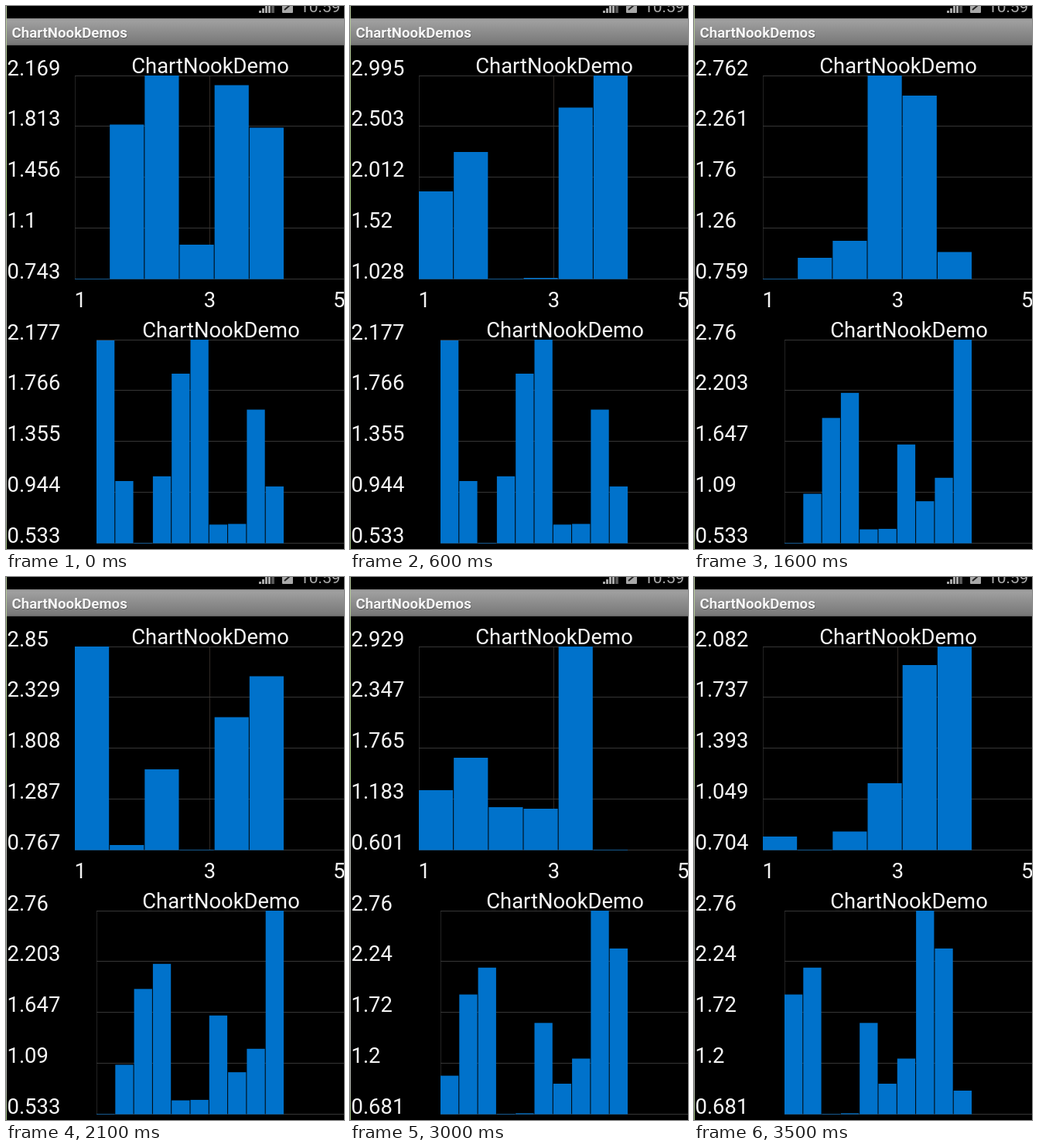
Recreate the animation shown at these times as an HTML page. Size 437 by 703 pixels, loop 3800 ms.

```html
<!DOCTYPE html>
<html lang="en">
<head>
<meta charset="utf-8">
<title>Bar charts</title>
<style>
  html, body { margin: 0; width: 100%; height: 100%; overflow: hidden; background: #000; }
  svg { display: block; width: 437px; height: 703px; font: 27.4px Roboto, sans-serif; fill: #f6f6f6; }
</style>
</head>
<body>
<svg id="stage" viewBox="0 0 437 703">
  <defs>
    <linearGradient id="bar" x2="0" y2="1">
      <stop offset="0" stop-color="#8d8d8d"/>
      <stop offset=".08" stop-color="#a0a0a0"/>
      <stop offset=".5" stop-color="#8c8c8c"/>
      <stop offset=".94" stop-color="#797979"/>
      <stop offset="1" stop-color="#606060"/>
    </linearGradient>
    <linearGradient id="edge" x2="0" y2="1">
      <stop offset="0" stop-color="#b4c69c"/>
      <stop offset=".37" stop-color="#a9d183"/>
      <stop offset=".4" stop-color="#b9bdb5"/>
      <stop offset=".94" stop-color="#b2b6ae"/>
      <stop offset="1" stop-color="#9cc079"/>
    </linearGradient>
  </defs>
  <rect width="437" height="703" fill="#000"/>
  <g fill="#a9a9a9">
    <path d="M327 9V6h3v3zM331 9V3h3v6zM335 9V0h3v9zM339 9V0h3v9z"/>
    <path d="M343 9V0h4v9z" fill="#565656"/>
    <rect x="357" y="-5" width="14" height="14" rx="1"/>
    <path d="M360 5l7-6" stroke="#222" stroke-width="2"/>
    <text x="380" y="7.5" font-size="21">10:59</text>
  </g>
  <rect y="16" width="437" height="35" fill="url(#bar)"/>
  <g font-size="18.7" font-weight="700">
    <text x="8" y="42" fill="#444" opacity=".7">ChartNookDemos</text>
    <text x="7.5" y="41">ChartNookDemos</text>
  </g>
  <g id="charts"></g>
  <rect width="1" height="703" fill="url(#edge)"/>
</svg>
<script>
const LOOP = 3800, H = 263, RIGHT = 360;
const root = document.getElementById('charts');

function add(tag, attrs, text = '') {
  const el = document.createElementNS('http://www.w3.org/2000/svg', tag);
  for (const k in attrs) el.setAttribute(k, attrs[k]);
  el.textContent = text;
  return root.appendChild(el);
}

function makeChart({ left, top, count, titleX, midLine }) {
  const base = top + H, step = (RIGHT - left) / count;
  const rows = [0, 1, 2, 3, 4].map(i => Math.floor(top + i * H / 4));
  const line = (d, stroke) => add('path', { d, stroke, fill: 'none' });
  if (midLine) line(`M${midLine} ${top}V${base}`, '#302a25');
  line(`M${left + .5} ${top}V${base}`, '#222');
  line(rows.map(y => `M${left} ${y + .5}H437`).join(''), '#363636');
  const bars = Array.from({ length: count }, (_, i) =>
    add('rect', { x: left + i * step, width: step - 1, fill: '#0072cb' }));
  const labels = rows.map(y => add('text', { x: 1.5, y }));
  add('text', { x: titleX, y: top - 3.5, 'text-anchor': 'middle' }, 'ChartNookDemo');

  return (lo, hi, heights) => {
    labels.forEach((el, i) => {
      el.textContent = +(hi - (hi - lo) * i / 4).toFixed(3);
    });
    bars.forEach((el, i) => {
      el.setAttribute('y', base - heights[i]);
      el.setAttribute('height', heights[i] + .6);
    });
  };
}

const drawTop = makeChart({ left: 89, top: 90, count: 6, titleX: 264, midLine: 263.5 });
const drawBottom = makeChart({ left: 117, top: 432, count: 10, titleX: 278 });
[['1', 88.5, 'start'], ['3', 263.5, 'middle'], ['5', 438.5, 'end']].forEach(([s, x, anchor]) =>
  add('text', { x, y: 389.5, 'text-anchor': anchor }, s));

// start time, lowest value, highest value, bar heights
const sets = [
  [0, .743, 2.1692, [0, 199.5, 263, 44, 250.5, 195.5]],
  [100, .801, 2.204, [70, 150, 100, 0, 190, 263]],
  [600, 1.0283, 2.9951, [113, 164, 0, 1, 221.5, 263]],
  [1000, 1.1164, 2.5694, [263, 238, 116, 256.5, 200.5, 0]],
  [1600, .7588, 2.7618, [0, 27, 49, 263, 237, 34.5]],
  [2100, .7666, 2.8497, [263, 6, 104, 0, 171.5, 224.5]],
  [2500, .702, 2.214, [160, 90, 120, 70, 263, 0]],
  [3000, .601, 2.929, [77, 119, 55, 53, 263, 0]],
  [3500, .7042, 2.0818, [17, 0, 23.5, 86, 239, 263]]
];

// the lower chart scrolls over this series, one value each 800 ms
const series = [2.171, 1.033, .533, 1.071, 1.902, 2.177, .6806, .686,
  1.611, .989, 1.246, 2.7601, 2.373, .918];

function render(t) {
  const [, lo, hi, heights] = sets.filter(s => s[0] <= t).pop();
  drawTop(lo, hi, heights);

  const first = Math.floor(t / 800), view = series.slice(first, first + 10);
  const min = Math.min(...view), max = Math.max(...view);
  drawBottom(min, max, view.map(v => (v - min) / (max - min) * H));
}

const start = performance.now();
function tick() {
  render((performance.now() - start) % LOOP);
  requestAnimationFrame(tick);
}
tick();
</script>
</body>
</html>
```
